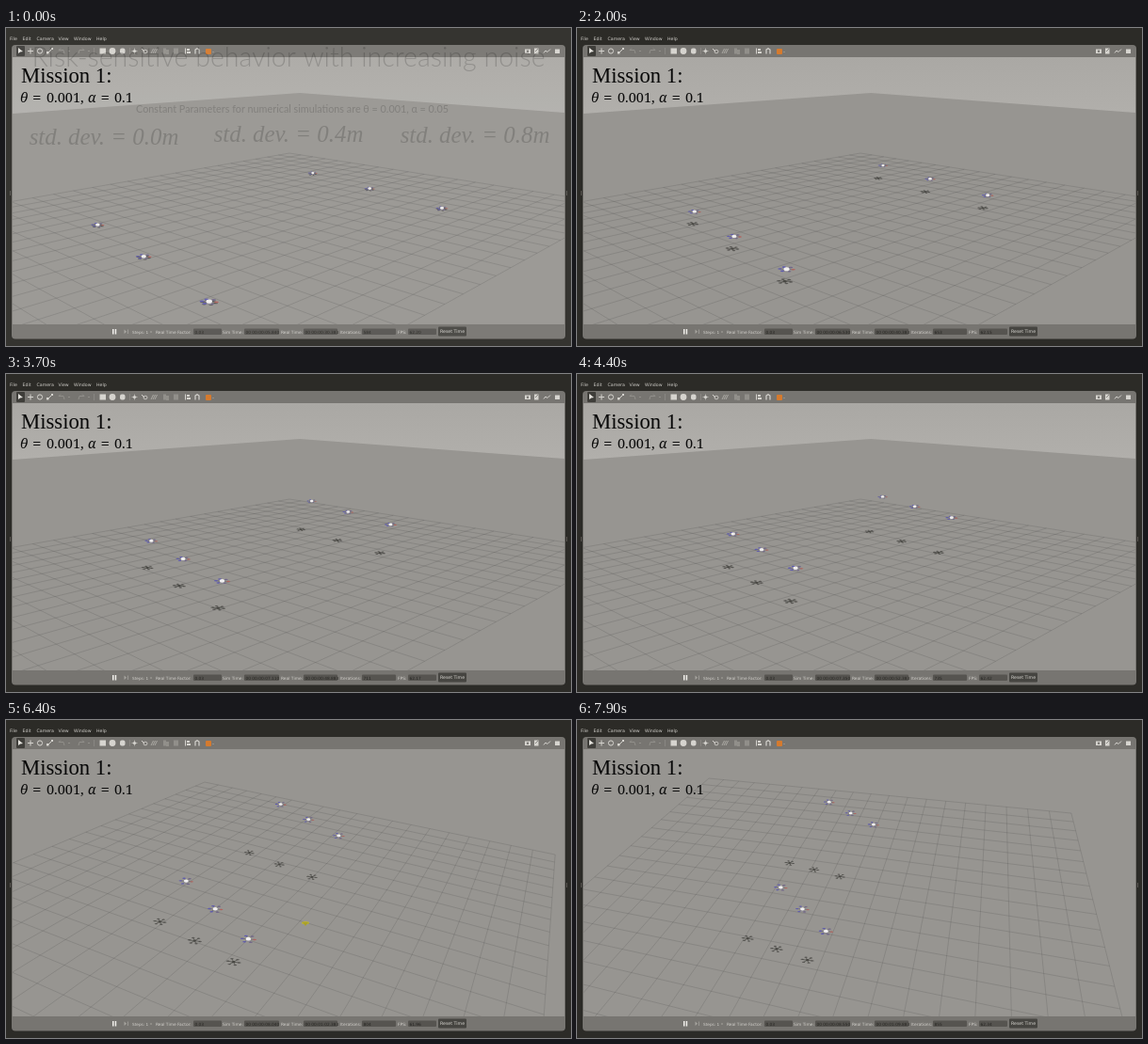
These frames come from a looping animation (600x338 px, 8000 ms). An HTML page with a canvas:

```html
<!DOCTYPE html>
<html lang="en">
<head>
<meta charset="utf-8">
<title>Mission 1</title>
<style>
html, body { margin: 0; width: 100%; height: 100%; overflow: hidden; background: #2c2b27; }
canvas { display: block; width: 600px; height: 338px; }
</style>
</head>
<body>
<canvas id="stage" width="600" height="338"></canvas>
<script>
const ctx = document.getElementById('stage').getContext('2d');
const LOOP = 8000, STEP = 100;
const CUT = 6.4, SETTLE = 7.2; // seconds: camera jumps, then comes to rest
const SANS = '"DejaVu Sans", sans-serif';
const TIMES = '"Liberation Serif", "Times New Roman", serif';
const MATH = '"Noto Serif", serif';
const BAR = '#777571';

const mix = (a, b, p) => a + (b - a) * p;
const clamp = v => Math.max(0, Math.min(1, v));

// A ground view: far corner, then a vanishing point and rate for each axis.
function makeView(corner, [ix, iy, iw], [jx, jy, jw]) {
  return [...corner, 1, -ix * iw, -iy * iw, -iw, -jx * jw, -jy * jw, -jw];
}
const LOW = makeView([301, 133], [966, 17, .0171], [-439, 17, .0162]);
const TURN = makeView([211, 66], [600, -98, .0245], [-1035, -192, .0115]);
const HIGH = makeView([140, 62], [449, -205, .0235], [-1501, -96, .0095]);

function viewAt(s) {
  if (s < CUT) return LOW;
  const p = clamp((s - CUT) / (SETTLE - CUT));
  return TURN.map((v, k) => mix(v, HIGH[k], p));
}

function project(view, i, j) {
  const [x, y, w] = [0, 1, 2].map(k => view[k] + i * view[k + 3] + j * view[k + 6]);
  return [x / w, y / w, w];
}

// Two rows of three drones climb while the formation closes up.
function formation(s, view) {
  const open = Math.exp(-.073 * s ** 1.4);
  const rise = Math.max(1, 10 * (s - .6));
  const late = clamp((s - 4.4) / 2);
  const orbit = s >= CUT;
  const poses = [];
  for (const row of [1, -1]) {
    const near = row > 0;
    const climb = orbit ? (near ? .58 : .82) : (near ? .92 : .97);
    const lean = orbit ? .65 : (near ? .15 : .38);
    for (const col of [-1, 0, 1]) {
      const i = 11.5 + .2 * open + row * (1.4 + 5.25 * open) + col * .95 * open;
      const j = 8.8 + (1.65 + .35 * row + 4.5 * col) * open;
      const [x, y, w] = project(view, i, j);
      const lift = rise * climb * (1 - col * late * (near ? .28 : .08));
      poses.push({ shade: [x, y], body: [x + lift * lean, y - lift], size: 4.6 / w });
    }
  }
  return poses;
}

function text(s, x, y, font, color, align = 'left') {
  ctx.font = font;
  ctx.fillStyle = color;
  ctx.textAlign = align;
  ctx.fillText(s, x, y);
}

function box(x, y, w, h, color, radius = 0) {
  ctx.fillStyle = color;
  ctx.beginPath();
  ctx.roundRect(x, y, w, h, radius);
  ctx.fill();
}

function path(points, color, width = 1, fill) {
  ctx.beginPath();
  points.forEach(([x, y], k) => k ? ctx.lineTo(x, y) : ctx.moveTo(x, y));
  if (fill) {
    ctx.fillStyle = color;
    ctx.fill();
  } else {
    ctx.strokeStyle = color;
    ctx.lineWidth = width;
    ctx.stroke();
  }
}

function oval(x, y, rx, ry, color, line) {
  ctx.beginPath();
  ctx.ellipse(x, y, rx, ry, 0, 0, 7);
  if (line) {
    ctx.strokeStyle = color;
    ctx.lineWidth = line;
    ctx.stroke();
  } else {
    ctx.fillStyle = color;
    ctx.fill();
  }
}

function ground(s, view) {
  box(7, 31, 586, 284, '#979591');
  if (s < CUT) {
    const sky = ctx.createLinearGradient(0, 31, 0, 90);
    sky.addColorStop(0, '#aaa8a4');
    sky.addColorStop(1, '#b1afab');
    path([[7, 31], [593, 31], [593, 90], [312, 69], [7, 91]], sky, 1, true);
  }
  const line = (a, b) => path([project(view, ...a), project(view, ...b)], 'rgba(62,61,58,.27)', .65);
  const rows = 24, cols = 20;
  for (let i = 0; i <= rows; i++) line([i, 0], [i, cols]);
  for (let j = 0; j <= cols; j++) line([0, j], [rows, j]);
}

function arms([x, y], size, flat, turn, each) {
  for (let k = 0; k < 6; k++) {
    const a = turn + k * Math.PI / 3;
    each(x + Math.cos(a) * size, y + Math.sin(a) * size * flat, Math.cos(a));
  }
}

function shadow(at, size, flat) {
  arms(at, size * .68, flat, .25, (x, y) => {
    path([at, [x, y]], '#4d4c48', .7);
    oval(x, y, size * .2, size * .08, 'rgba(70,69,65,.7)');
  });
  oval(...at, size * .18, size * .13, '#484743');
}

function drone(at, size, flat) {
  const [x, y] = at;
  arms(at, size * .72, flat, .15, (ax, ay, side) => {
    path([at, [ax, ay]], '#66636c', .6);
    oval(ax, ay, size * .22, size * .08, side < .3 ? '#5f5bae' : side > .9 ? '#b0645e' : '#716689');
  });
  oval(x, y + size * .14, size * .24, size * .17, '#8b8890');
  oval(x, y - size * .03, size * .3, size * .2, '#f0eeef');
}

function fleet(s, view) {
  const poses = formation(s, view);
  const flat = s < CUT ? .34 : .55;
  poses.forEach(p => shadow(p.shade, p.size, flat));
  poses.forEach(p => drone(p.body, p.size, flat));
  if (s >= CUT && s < SETTLE) {
    oval(318, 215.5, 4, 1.6, '#bdb42c');
    path([[315, 215], [321, 215], [318, 219]], '#aaa128', 1, true);
  }
}

function toolbar() {
  const ink = '#d6d4cf', dim = '#918f8a';
  box(11, 19, 9, 11, '#3f3e3a', 1);
  path([[13, 21], [13, 27], [15, 25.6], [18, 25]], '#e4e2dd', 1, true);
  path([[23, 24.5], [29, 24.5]], ink);
  path([[26, 21.5], [26, 27.5]], ink);
  oval(36, 24.5, 2.6, 2.6, ink, 1);
  path([[44, 27], [49, 22]], ink);
  box(43, 25, 2.5, 2.5, ink);
  box(48, 21, 2, 2, ink);
  for (const [x, d] of [[59, 1], [80, -1]]) {
    path([[x + 3 * d, 27], [x + 2 * d, 23.5], [x - 3 * d, 23.5], [x - d, 21.5]], dim);
    box(x + 7, 24, 2, 1, dim);
  }
  box(99.5, 21.5, 6.5, 6, ink);
  oval(113, 24.5, 3.4, 3.4, ink);
  box(121, 21.5, 5.5, 6, ink, 2);
  box(93, 21, .7, 7, dim);
  box(131, 21, .7, 7, dim);
  oval(136.5, 24.5, 1.6, 1.6, ink);
  path([[133.5, 24.5], [139.5, 24.5]], ink, .6);
  path([[136.5, 21.5], [136.5, 27.5]], ink, .6);
  path([[144, 22], [147, 25]], ink);
  oval(148, 25, 2, 1.8, ink, .8);
  for (let x = 154; x < 160; x += 2) path([[x, 27], [x + 2.5, 22]], '#b1afaa', .9);
  box(167, 21.5, 3, 6, dim);
  box(170, 23, 3, 5, dim);
  box(178, 21.5, 5, 6, dim);
  box(190, 21.5, 1, 6, ink);
  box(192, 22, 3, 2, ink);
  box(192, 25, 4, 2, ink);
  path([[201, 27.5], [201, 23], [203, 21.8], [205, 23], [205, 27.5]], ink, 1.2);
  box(212, 22, 6, 6, '#d57a2e', 1);
  box(219, 25, 2, 1, dim);

  box(551, 22.5, 6, 4.5, ink);
  oval(554, 24.7, 1.2, 1.2, BAR);
  box(561, 21.5, 4.5, 6, ink);
  path([[562, 25], [565, 22]], BAR, .8);
  path([[571, 26.5], [573, 24], [575, 25.5], [578, 22.5]], ink);
  box(583, 22.5, 5, 4.5, ink);
}

function chrome() {
  box(0, 0, 600, 338, '#2c2b27');
  box(6, 18, 588, 312.5, BAR, 4);
  box(4, 173, 1, 5, '#5a5853');
  box(595, 173, 1, 5, '#5a5853');
  [['File', 4], ['Edit', 17.5], ['Camera', 32.5], ['View', 55.5], ['Window', 72], ['Help', 96]]
    .forEach(([s, x]) => text(s, x, 13.3, '4.7px ' + SANS, '#cfcdc8'));
  toolbar();
}

function status(s) {
  const ink = '#d3d1cc', dim = '#a5a39e';
  const pad = (v, n) => String(v).padStart(n, '0');
  const clock = v => '00 00:' + pad(Math.floor(v / 60), 2) + ':' + pad((v % 60).toFixed(3), 6);
  const steps = Math.round(584 + s * 34.3);
  box(113, 320, 1.5, 5.5, '#f0eeea');
  box(115.7, 320, 1.5, 5.5, '#f0eeea');
  path([[125.5, 320.5], [128, 322.7], [125.5, 325]], dim, 1, true);
  box(129, 320.5, .8, 4.5, dim);
  text('Steps: 1', 134, 324.5, '4.2px ' + SANS, ink);
  box(153, 322.5, 2, 1, dim);

  const cells = [
    ['Real Time Factor:', 159, 199, 30, '0.03'],
    ['Sim Time:', 230, 253, 37, clock(steps / 100)],
    ['Real Time:', 292, 316, 36, clock(30.383 + s * 5)],
    ['Iterations:', 355, 378, 36, String(steps)],
    ['FPS:', 416, 427, 30, (62.2 + .25 * Math.sin(s / .6)).toFixed(2)]
  ];
  for (const [label, x, fx, fw, value] of cells) {
    text(label, x, 324.5, '4.4px ' + SANS, ink);
    box(fx, 319.5, fw, 6.5, '#565450', 1);
    text(value, fx + 1.5, 324.5, '4.3px ' + SANS, '#252421');
  }
  box(459, 317.5, 30, 10, '#464541', 1);
  text('Reset Time', 474, 324.4, '4.7px ' + SANS, '#d4d2cd', 'center');
}

function caption() {
  text('Mission 1:', 16, 58, '22.7px ' + TIMES, '#080808');
  const y = 79, ink = '#0b0b0b';
  for (const [s, x] of [['θ', 15], ['α', 87]]) text(s, x, y, 'italic 14.5px ' + MATH, ink);
  for (const x of [28, 100.5]) text('=', x, y + .5, '17px ' + MATH, ink);
  for (const [s, x] of [['0.001,', 43], ['0.1', 115]]) text(s, x, y, '14.5px ' + MATH, ink);
}

// The outgoing title slide, almost gone when the loop starts.
function slide(s) {
  const fade = 1 - s / .2;
  if (fade <= 0) return;
  ctx.globalAlpha = fade;
  box(0, 0, 600, 338, 'rgba(255,255,255,.045)');
  const ink = 'rgba(0,0,0,.17)';
  text('Risk-sensitive behavior with increasing noise', 300, 41, '300 28.6px Lato, sans-serif', ink, 'center');
  text('Constant Parameters for numerical simulations are θ = 0.001, α = 0.05', 304, 90,
    '10.8px Lato, sans-serif', ink, 'center');
  [['0.0', 104, 124], ['0.4', 300, 121], ['0.8', 498, 122]].forEach(([v, x, y]) =>
    text('std. dev. = ' + v + 'm', x, y, 'italic 24.9px ' + TIMES, ink, 'center'));
  ctx.globalAlpha = 1;
}

function draw(time) {
  const s = Math.floor(time % LOOP / STEP) * STEP / 1000;
  const view = viewAt(s);
  chrome();
  ctx.save();
  ctx.beginPath();
  ctx.rect(7, 31, 586, 284);
  ctx.clip();
  ground(s, view);
  fleet(s, view);
  ctx.restore();
  status(s);
  slide(s);
  caption();
}

const start = performance.now();
function tick() {
  draw(performance.now() - start);
  requestAnimationFrame(tick);
}
tick();
</script>
</body>
</html>
```
